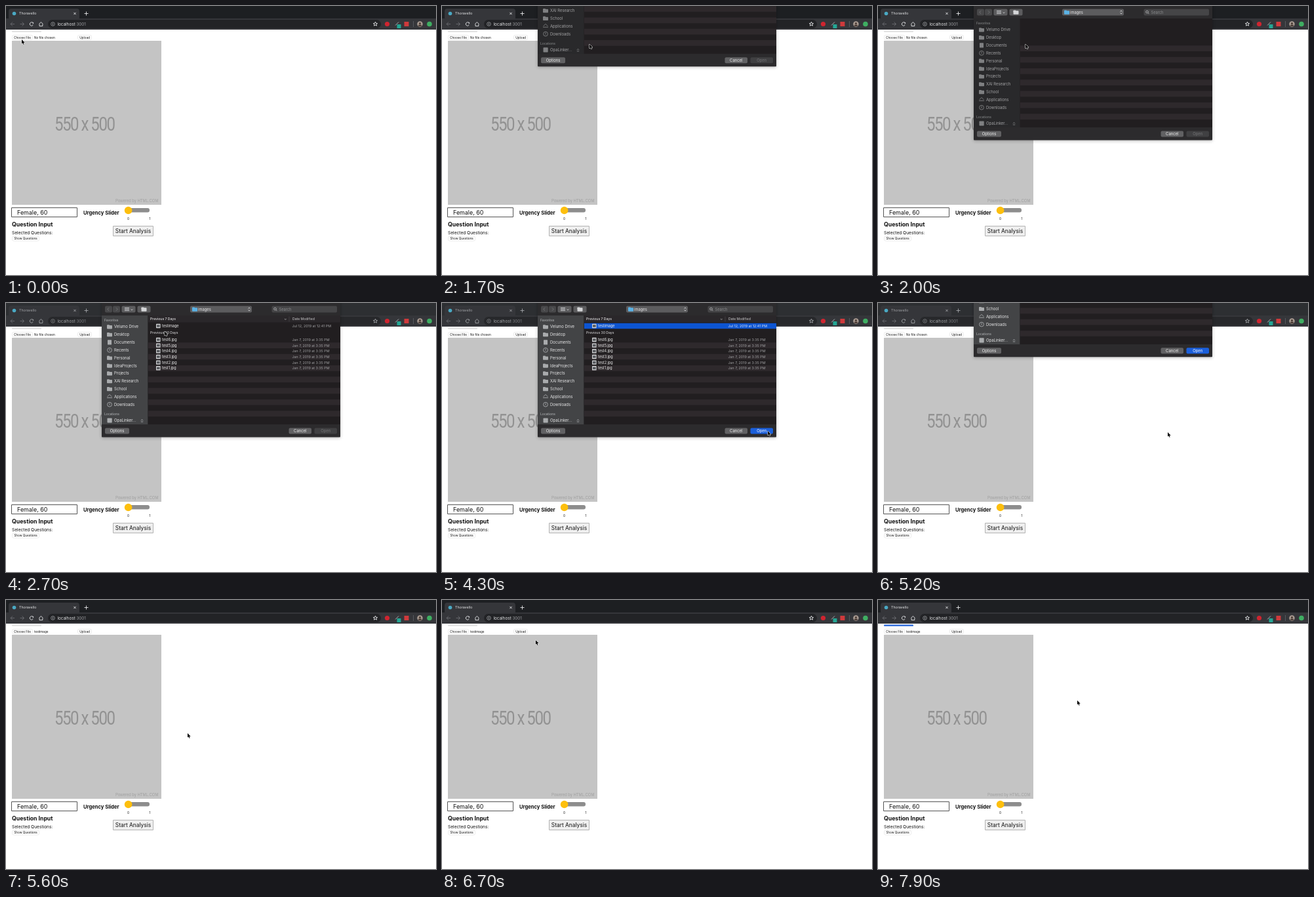
Animation, 656 px wide and 410 px high, one loop 8000 ms. Source, as an HTML page with a canvas:

```html
<!DOCTYPE html>
<html lang="en">
<head>
<meta charset="utf-8">
<title>Upload demo</title>
<style>
html, body { margin: 0; width: 100%; height: 100%; overflow: hidden; background: #fff; }
canvas { display: block; width: 656px; height: 410px; }
</style>
</head>
<body>
<canvas id="stage" width="656" height="410"></canvas>
<script>
const ctx = document.getElementById('stage').getContext('2d');
const LOOP = 8000, STEP = 100, MOVE = 600;
const SANS = 'Inter, "Liberation Sans", sans-serif';
const SHEET = { x: 146, w: 364, h: 204.4, split: 216.5 };
const ROW = 8.66, ITEM = 11.85;
const FAVORITES = ['Velumo Drive', 'Desktop', 'Documents', 'Recents', 'Personal',
  'IdeaProjects', 'Projects', 'XAI Research', 'School', 'Applications', 'Downloads'];

// where the pointer comes to rest, and when
const STOPS = [
  { at: 0, x: 24, y: 51 },
  { at: 1000, x: 294, y: 68 },
  { at: 1700, x: 225, y: 58 },
  { at: 2700, x: 242, y: 43 },
  { at: 3100, x: 244, y: 33 },
  { at: 4300, x: 497, y: 195 },
  { at: 5600, x: 277, y: 203 },
  { at: 6400, x: 190, y: 90 },
  { at: 6900, x: 118, y: 46 },
  { at: 7900, x: 304, y: 153 }
];

const mix = (a, b, k) => a + (b - a) * k;
const ease = k => (1 - Math.cos(Math.PI * Math.max(0, Math.min(1, k)))) / 2;
const during = (t, from, to) => ease((t - from) / (to - from));

function rect(x, y, w, h, fill, r = 0, stroke) {
  ctx.beginPath();
  ctx.roundRect(x, y, w, h, r);
  ctx.fillStyle = fill;
  ctx.fill();
  if (!stroke) return;
  ctx.strokeStyle = stroke;
  ctx.lineWidth = 1;
  ctx.stroke();
}

function disc(x, y, r, fill) {
  rect(x - r, y - r, 2 * r, 2 * r, fill, r);
}

function line(color, ...points) {
  ctx.beginPath();
  for (const [x, y] of points) ctx.lineTo(x, y);
  ctx.strokeStyle = color;
  ctx.lineWidth = 0.9;
  ctx.stroke();
}

function ring(x, y, r, color, gap = 0) {
  ctx.beginPath();
  ctx.arc(x, y, r, gap, 2 * Math.PI - gap);
  ctx.strokeStyle = color;
  ctx.lineWidth = 0.9;
  ctx.stroke();
}

// quarter turns: 0 right, 1 down, 2 left, 3 up
function chevron(x, y, r, turn, color) {
  const c = r * Math.cos(turn * Math.PI / 2), s = r * Math.sin(turn * Math.PI / 2);
  line(color, [x - s, y + c], [x + c, y + s], [x + s, y - c]);
}

function cross(x, y, r, angle, color) {
  for (const a of [angle, angle + Math.PI / 2]) {
    const dx = r * Math.cos(a), dy = r * Math.sin(a);
    line(color, [x - dx, y - dy], [x + dx, y + dy]);
  }
}

function star(x, y, r, color) {
  const points = Array.from({ length: 11 }, (_, i) => {
    const a = (i / 5 - 0.5) * Math.PI, d = i % 2 ? r * 0.45 : r;
    return [x + d * Math.cos(a), y + d * Math.sin(a)];
  });
  line(color, ...points);
}

// y is the middle of the capitals
function text(str, x, y, size, color, weight = 400, align = 'left') {
  ctx.font = `${weight} ${size}px ${SANS}`;
  ctx.textAlign = align;
  ctx.fillStyle = color;
  ctx.fillText(str, x, y + size * 0.36);
}

function button(label, x, y, w, h, size, fill, color, stroke, r = 2) {
  rect(x, y, w, h, fill, r, stroke);
  text(label, x + w / 2, y + h / 2, size, color, 400, 'center');
}

function drawBrowser(active) {
  const ink = active ? '#e6e7e9' : '#a2a4a7';
  const soft = active ? '#9a9ca0' : '#7c7e82';
  const dim = '#6b6d71', mid = 27.5;
  rect(0, 0, 656, 20, active ? '#1d1f22' : '#2d2f32');
  rect(4, 4, 108, 18, '#35363a', 4);
  rect(0, 19, 656, 17, '#35363a');
  disc(12.5, 11.5, 2.8, '#4aa9c4');
  text('Thoravello', 20, 11.5, 5.3, ink);
  cross(105, 11.5, 2.3, Math.PI / 4, ink);
  cross(122.5, 11.5, 3, 0, ink);

  for (const [x, turn] of [[10, 2], [24.5, 0]]) {
    line(dim, [x - 3, mid], [x + 3, mid]);
    chevron(x, mid, 3, turn, dim);
  }
  ring(39, mid, 2.7, ink, 0.6);
  chevron(40.6, 26, 1.5, 0, ink);
  chevron(53.4, mid, 3, 3, ink);
  line(ink, [51, mid], [51, 30.6], [55.8, 30.6], [55.8, mid]);

  rect(64, 21, 508, 13, active ? '#222326' : '#27282b', 6.5);
  ring(71.5, mid, 2.8, soft);
  line(soft, [71.5, 26], [71.5, 29]);
  text('localhost', 78.5, mid, 6.35, ink);
  text(':3001', 78.5 + ctx.measureText('localhost').width, mid, 6.35, soft);
  star(563.5, mid, 3.3, ink);

  disc(581.5, mid, 3.6, '#cf2530');
  line('#b9bcc0', [594, 29.5], [599, 24.5]);
  rect(596.5, 28, 6, 6, '#23a694');
  rect(607.5, 24, 7, 7, '#cf3a3c');
  line('#5b5d61', [621.5, 23], [621.5, 32]);
  disc(631.5, mid, 4.2, '#a99b92');
  disc(631.5, mid - 1, 1.6, '#4a3b35');
  rect(629, mid + 1, 5, 2.6, '#4a3b35', 1.3);
  disc(646, mid, 3.8, '#3fae62');
}

function drawPlaceholder() {
  ctx.save();
  ctx.translate(9, 53);
  ctx.scale(228 / 550, 250 / 500);
  rect(0, 0, 550, 500, '#c4c4c4');
  ctx.textAlign = 'center';
  ctx.fillStyle = '#929292';
  ctx.letterSpacing = '-3.6px';
  ctx.font = '58px Roboto, sans-serif';
  ctx.fillText('550 x 500', 267, 274);
  ctx.letterSpacing = '0px';
  ctx.textAlign = 'right';
  ctx.fillStyle = '#a0a0a0';
  ctx.font = '14.5px "Liberation Sans", sans-serif';
  ctx.fillText('Powered by HTML.COM', 539, 492);
  ctx.restore();
}

function drawPage(fileName, progress) {
  const ink = '#111';
  const small = (label, x, y, w) => button(label, x, y, w, 7, 4.65, '#fff', ink, '#ebebeb');
  rect(0, 36, 656, 374, '#fff');
  rect(9, 37.4, 45, 2.6, '#e5e5e5', 1);
  rect(9, 37.4, 45 * progress, 2.6, '#3874e0', 1);
  small('Choose File', 9.5, 44.5, 31);
  small('Upload', 109.5, 44.5, 21);
  text(fileName, 43, 48, 4.65, ink);
  drawPlaceholder();

  rect(8.5, 307.5, 100, 14, '#fff', 0, '#555');
  text('Female, 60', 17, 315, 8.9, ink);
  text('Urgency Slider', 118, 315.7, 7.6, ink, 700);
  rect(182, 308, 37, 6.4, '#8d8d8d', 3);
  disc(186.6, 311.5, 5.8, '#fdbf0d');
  text('0', 186.5, 324.6, 4.8, ink, 400, 'center');
  text('1', 219.5, 324.6, 4.8, ink, 400, 'center');
  text('Question Input', 9, 333.3, 8.7, ink, 700);
  text('Selected Questions:', 9, 345.5, 6.6, ink);
  small('Show Questions', 9.5, 351, 41);
  button('Start Analysis', 163.5, 335.5, 61, 15, 8.4, '#efefef', ink, '#b3b3b3', 0);
}

function folder(x, y, color) {
  rect(x, y - 3, 4, 3, color, 0.8);
  rect(x, y - 2.2, 8, 5.4, color, 0.8);
}

function sidebarIcon(name, y, color) {
  const x = 158;
  if (name === 'Documents') rect(x - 3, y - 3.6, 6, 7.2, color, 0.6);
  else if (name === 'Applications') {
    chevron(x, y, 3.4, 3, color);
    line(color, [x - 4, y + 1.5], [x + 4, y + 1.5]);
  } else if (name === 'Recents' || name === 'Downloads') {
    ring(x, y, 3.4, color);
    line(color, [x, y - 2], [x, y + 1]);
  } else folder(x - 4, y, color);
}

function drawSidebar(ready) {
  const ink = ready ? '#e8e8e9' : '#a4a4a6';
  const soft = ready ? '#a9abad' : '#7f8082';
  rect(SHEET.x, 19, SHEET.split - SHEET.x, 166, ready ? '#434446' : '#29292b');
  text('Favorites', 150, 26.2, 4.9, soft, 500);
  FAVORITES.forEach((name, i) => {
    const y = 36.2 + i * ITEM;
    sidebarIcon(name, y, soft);
    text(name, 165, y, 5.9, ink);
  });
  text('Locations', 150, 169.2, 4.9, soft, 500);
  rect(154.5, 175.4, 7.2, 7.2, soft, 0.8);
  text('OpaLinker...', 165, 179.3, 5.9, ink);
  chevron(207.5, 179.2, 1.7, 3, soft);
  line(soft, [205.8, 181], [209.2, 181]);
}

function fileRow(name, date, y, selected) {
  if (selected) rect(217, y - ROW / 2, 293, ROW, '#0d55d2');
  rect(229, y - 3.2, 6.6, 6.4, '#d2d3d5', 0.6);
  rect(230, y - 1.8, 4.6, 3.6, '#55585c');
  text(name, 238, y, 5.5, '#f0f0f0');
  text(date, 436.5, y, 5.35, selected ? '#dfe8fb' : '#a3a3a5');
}

function drawList(ready, selected) {
  const first = 56;
  rect(SHEET.split, 19, 293.5, 166, '#211e20');
  for (let y = first + ROW / 2; y < 180; y += 2 * ROW) rect(217, y, 293, ROW, '#2e292c');
  if (!ready) return;
  rect(217, 19, 293, 10.6, '#2a272a');
  line('#454245', [432, 20.5], [432, 28.5]);
  text('Previous 7 Days', 220, 24.3, 5.1, '#e2e2e3', 500);
  chevron(426.3, 24, 1.4, 1, '#a8a8aa');
  text('Date Modified', 437, 24.3, 5.1, '#d0d0d2');
  fileRow('testimage', 'Jul 12, 2019 at 12:41 PM', 35, selected);
  text('Previous 30 Days', 220, 45.5, 5.1, '#c9c9cb', 500);
  for (let i = 0; i < 6; i++) {
    fileRow(`test${6 - i}.jpg`, 'Jan 7, 2019 at 3:35 PM', first + i * ROW);
  }
}

function drawSheetToolbar() {
  const ink = '#d5d6d8', mid = 9.5;
  const box = (x, w, fill) => rect(x, 4.6, w, 9.8, fill, 2);
  box(151, 11, '#48484a');
  box(163, 11, '#48484a');
  chevron(157, mid, 2.2, 2, '#77787a');
  chevron(168, mid, 2.2, 0, '#77787a');
  box(176.5, 21, '#5c5c5e');
  for (let i = -1; i <= 1; i++) line(ink, [181, mid + 2 * i], [188, mid + 2 * i]);
  chevron(192, mid, 1.4, 1, ink);
  box(200.5, 20, '#5c5c5e');
  folder(206.5, mid, ink);
  box(281, 94, '#5c5c5e');
  folder(284, mid, '#5bb3e6');
  text('images', 293, mid, 5.8, '#ececed');
  chevron(371, mid - 1, 1.5, 3, ink);
  chevron(371, mid + 1, 1.5, 1, ink);
  box(405.5, 99.5, '#454547');
  ring(410.5, 9, 1.8, '#b0b1b3');
  line('#b0b1b3', [411.7, 10.2], [413.3, 12]);
  text('Search', 416.5, mid, 5.7, '#8b8c8e');
}

function drawSheet(offset, ready, selected) {
  const option = (label, x, w, fill = '#616163', color = '#f0f0f0') =>
    button(label, x, 190.4, w, 9, 5.9, fill, color);
  ctx.save();
  ctx.translate(0, offset);
  ctx.shadowColor = 'rgba(0,0,0,.28)';
  ctx.shadowBlur = 5;
  ctx.shadowOffsetY = 1;
  rect(SHEET.x, -12, SHEET.w, SHEET.h + 12, '#2c2b2d', 1);
  ctx.shadowColor = 'transparent';
  drawSheetToolbar();
  drawSidebar(ready);
  drawList(ready, selected);
  option('Options', 151, 37);
  option('Cancel', 431.5, 34.5);
  if (selected) option('Open', 470.5, 34.5, '#1b5fdb', '#fff');
  else option('Open', 470.5, 34.5, '#404042', '#747476');
  ctx.restore();
}

function pointerAt(t) {
  const next = STOPS.findIndex(stop => stop.at > t);
  if (next < 0) return STOPS[STOPS.length - 1];
  const a = STOPS[next - 1], b = STOPS[next];
  const k = during(t, Math.max(a.at, b.at - MOVE), b.at);
  return { x: mix(a.x, b.x, k), y: mix(a.y, b.y, k) };
}

function drawPointer({ x, y }) {
  const shape = new Path2D('M0 0V6.6L1.5 5.3L2.5 7.7L3.6 7.2L2.6 4.9H4.7Z');
  ctx.save();
  ctx.translate(x, y);
  ctx.strokeStyle = '#fff';
  ctx.lineWidth = 1;
  ctx.stroke(shape);
  ctx.fillStyle = '#000';
  ctx.fill(shape);
  ctx.restore();
}

function draw(t) {
  const shown = during(t, 1435, 2000) - during(t, 4943, 5400);
  drawPage(t < 5400 ? 'No file chosen' : 'testimage', during(t, 7100, 7500));
  drawBrowser(t < 2100 || t >= 5600);
  if (shown > 0) drawSheet((shown - 1) * SHEET.h, t >= 2100, t >= 3300);
  drawPointer(pointerAt(t));
}

function tick() {
  const t = performance.now() % LOOP;
  draw(Math.floor(t / STEP) * STEP);
  requestAnimationFrame(tick);
}
tick();
</script>
</body>
</html>
```
